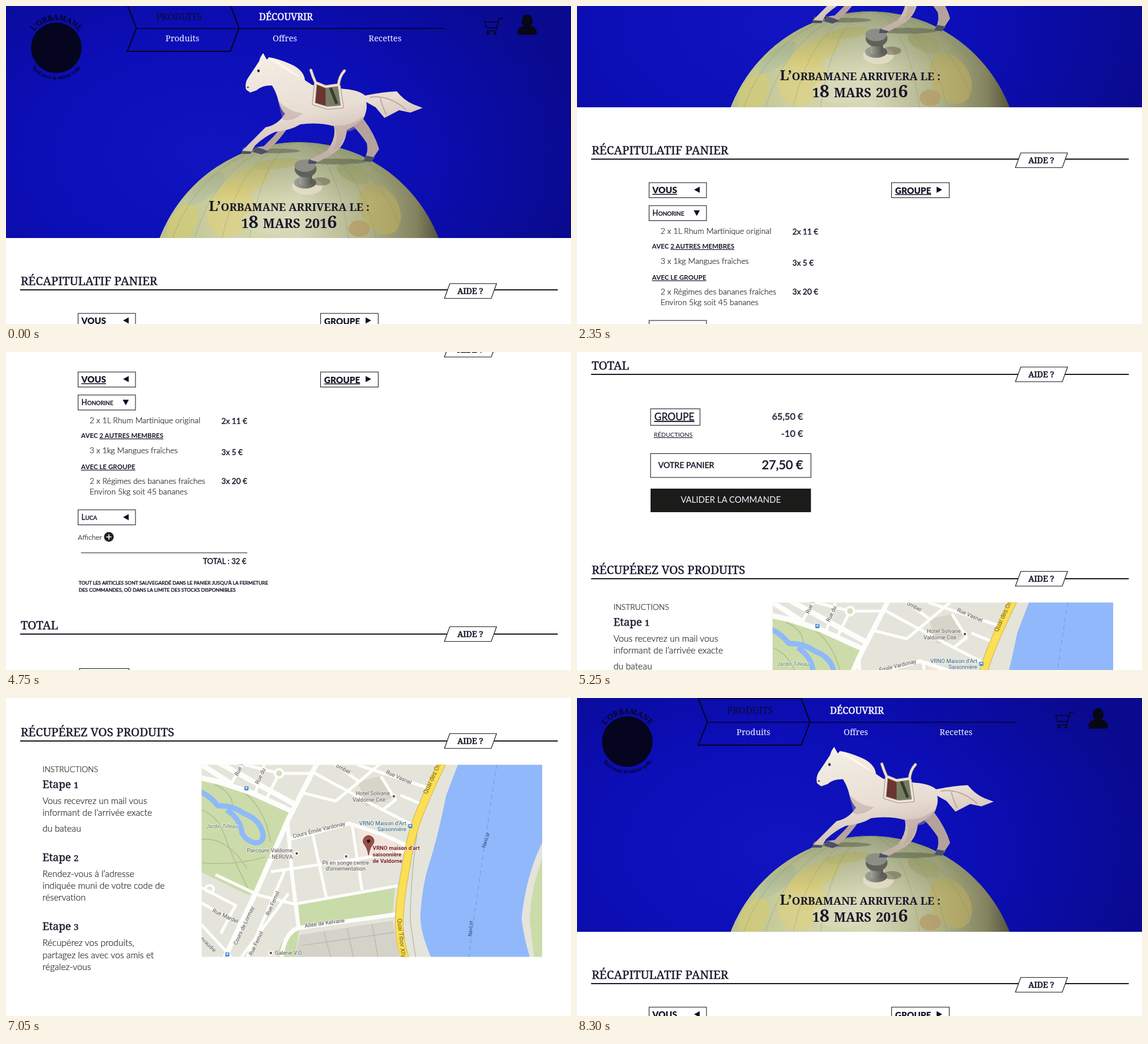
Recreate the animation shown at these times as an HTML page. Size 960 px wide and 540 px high, loop 9.3 s.

```html
<!DOCTYPE html>
<html lang="fr">
<head>
<meta charset="utf-8">
<title>Panier</title>
<style>
  html, body { margin: 0; width: 100%; height: 100%; overflow: hidden; background: #fff; }
  svg { display: block; width: 960px; height: 540px; }
  text { fill: currentColor; color: #17172a; font-family: Lato, sans-serif; }
  .serif { font-family: "Noto Serif", serif; }
  .medium { stroke: currentColor; stroke-width: .4; }
  .strong { stroke: currentColor; stroke-width: .65; }
  .bold { font-weight: 700; }
  .black { font-weight: 900; }
  .light { font-weight: 300; color: #222; stroke: currentColor; stroke-width: .22; }
  .white { color: #f4f4ff; }
  .under { text-decoration: underline; }
  .end { text-anchor: end; }
  .mid { text-anchor: middle; }
  .box { fill: #fff; stroke: #25252b; stroke-width: 1.1; }
  .map text { font: 9.4px Roboto, sans-serif; color: #555; paint-order: stroke; stroke: #f2f1ec; stroke-width: 1.6; }
  .map .blue { color: #2c6088; }
  .map .red { color: #7c2020; font-weight: 700; }
  .map .park { color: #55804a; font-style: italic; }
  .map .ferry { color: #2c4468; stroke: none; font-size: 8.5px; }
  .map .quay { color: #77601a; font-size: 10.5px; stroke: none; }
  .road { fill: none; stroke: #fdfdfb; stroke-linejoin: round; }
</style>
</head>
<body>
<svg viewBox="0 0 960 540">
  <defs>
    <radialGradient id="backdrop" gradientUnits="userSpaceOnUse" cx="350" cy="250" r="640" gradientTransform="translate(0 90) scale(1 .65)">
      <stop offset="0" stop-color="#1114c0"/><stop offset=".5" stop-color="#0c0eb6"/><stop offset="1" stop-color="#0a0a8e"/>
    </radialGradient>
    <linearGradient id="globe" gradientUnits="userSpaceOnUse" x1="260" y1="0" x2="735" y2="0">
      <stop offset="0" stop-color="#b9c08e"/><stop offset=".25" stop-color="#cfd2a4"/><stop offset=".5" stop-color="#d6d8b8"/>
      <stop offset=".75" stop-color="#aeb188"/><stop offset=".92" stop-color="#83835f"/><stop offset="1" stop-color="#55543f"/>
    </linearGradient>
    <linearGradient id="shade" gradientUnits="userSpaceOnUse" x1="0" y1="231" x2="0" y2="330">
      <stop offset="0" stop-color="#59653f" stop-opacity=".45"/><stop offset="1" stop-color="#59653f" stop-opacity="0"/>
    </linearGradient>
    <linearGradient id="coat" x1="0" y1="0" x2=".3" y2="1">
      <stop offset="0" stop-color="#f5f0e8"/><stop offset=".6" stop-color="#e8ddd2"/><stop offset="1" stop-color="#c2afa5"/>
    </linearGradient>
    <linearGradient id="knob"><stop offset="0" stop-color="#a5a59b"/><stop offset="1" stop-color="#55564f"/></linearGradient>
    <clipPath id="heroClip"><rect y="-10" width="960" height="404"/></clipPath>
    <clipPath id="globeClip"><circle cx="498" cy="485" r="254"/></clipPath>
    <clipPath id="mapClip"><rect x="332.5" y="113.5" width="578.5" height="326"/></clipPath>
    <path id="nameArc" d="M38.5 71A47 47 0 0 1 132.5 71"/>
    <path id="sloganArc" d="M31.5 71A54 54 0 0 0 139.5 71"/>
  </defs>
  <g id="page"></g>
</svg>
<script>
const text = (x, y, size, content, cls = '', attrs = '') =>
  `<text x="${x}" y="${y}" font-size="${size}" class="${cls}" ${attrs}>${content}</text>`;
const path = (d, fill, attrs = '') => `<path d="${d}" fill="${fill}" ${attrs}/>`;
const ellipse = (cx, cy, rx, ry, fill, attrs = '') =>
  `<ellipse cx="${cx}" cy="${cy}" rx="${rx}" ry="${ry}" fill="${fill}" ${attrs}/>`;
const box = (x, y, w, h) => `<rect class="box" x="${x}" y="${y}" width="${w}" height="${h}"/>`;
const line = (x1, x2, y, width, color = '#1c1c22') =>
  `<path d="M${x1} ${y}H${x2}" stroke="${color}" stroke-width="${width}"/>`;
const section = (y, content) => `<g transform="translate(0 ${y})">${content}</g>`;
const arrow = (x, y, angle) =>
  path('M-4.5 0L5 -5.2V5.2Z', '#0c0c26', `transform="translate(${x} ${y}) rotate(${angle})"`);
const small = (size, content) => `<tspan font-size="${size}">${content}</tspan>`;
// Large initial followed by smaller capitals
const smallCaps = (x, y, size, first, rest, cls) => text(x, y, size, first + small(size * .74, rest), cls);

function heading(y, title, tagOffset = 13) {
  const top = y - tagOffset + .5;
  return text(25, y - 8, 19.9, title, 'serif medium') + line(24, 937.5, y, 1.9) +
    path(`M754 ${top}H833.5L824.5 ${top + 25}H745Z`, '#fff', 'stroke="#222" stroke-width="1.2"') +
    text(767, top + 17, 13.8, 'AIDE ?', 'serif strong');
}

function horse() {
  const hooves = 'M403 240L418 242 416 251H399ZM423 239L437 243 446 247 434 252 420 248ZM515 260L530 264 526 268H513ZM612 254L627 257 620 265 607 263Z';
  const farLegs = 'M470 204Q455 222 438 238L424 240 422 246 442 247Q458 236 478 208ZM586 200Q602 216 613 233 616 248 609 259L622 261 634 243Q627 218 606 190Z';
  const body = 'M437 80Q432 86 430 94L412 121Q405 131 408 142L415 147 426 143Q436 134 452 135 460 148 463 162 467 176 474 183 462 202 441 206 427 220 412 235L401 246 417 247 423 237Q440 221 457 214 484 211 500 201 530 197 557 204 562 224 545 246L516 261 530 265 556 251Q577 237 579 211 597 202 608 190 615 174 612 163L628 172 643 190Q655 184 668 177L687 181 708 173 692 167Q676 160 664 145 640 146 610 152 600 143 576 141L520 134 508 126Q506 108 482 98 464 90 447 87L443 91Z';
  const frame = 'M518 109Q521 119 526 130L543 137 565 134Q566 120 575 110M526 131L523 166 546 173 571 171 566 136';
  const frameStroke = (color, width) =>
    path(frame, 'none', `stroke="${color}" stroke-width="${width}" stroke-linecap="round" stroke-linejoin="round"`);
  return path(farLegs, '#b6a29c') + path(hooves, '#4a5168') + path(body, 'url(#coat)') +
    path('M462 160Q480 180 505 182 486 198 470 193ZM556 203Q588 205 608 186 600 211 580 213L566 240 556 245Q568 222 556 203Z', '#b49c98', 'opacity=".45"') +
    path('M446 89Q470 95 503 124L482 112Z', '#fffaf4', 'opacity=".8"') +
    path('M618 155Q650 150 680 176M636 157Q640 172 646 184', 'none', 'stroke="#bda9a5" stroke-width="2"') +
    ellipse(429, 110, 2.2, 2.5, '#342b30') + ellipse(411, 138, 1.8, 1.5, '#6b5555') +
    path('M524 128L543 136V171L523 165Z', '#6a352f') +
    path('M543 137L565 136 570 171 543 170Z', '#777d63') +
    path('M551 138L562 166', 'none', 'stroke="#343e2f" stroke-width="5"') +
    frameStroke('#8d7b78', 5.4) + frameStroke('#eee2d6', 3.8);
}

function globe() {
  const lands = [[405, 300, 48, 20, -28, '#e2d472'], [382, 345, 38, 48, 25, '#dfd07c'], [300, 370, 22, 36, 30, '#d8cd70'],
    [340, 310, 40, 14, -40, '#b4c3a4'], [460, 268, 40, 9, -8, '#d6cc74'], [635, 345, 32, 46, -30, '#bcae60'],
    [590, 285, 30, 14, 25, '#a9ac70'], [600, 378, 18, 14, 0, '#b8955c'], [450, 365, 50, 22, 0, '#dcdcc0']]
    .map(([x, y, rx, ry, a, color]) => ellipse(x, y, rx, ry, color,
      `opacity=".6" transform="rotate(${a} ${x} ${y})"`)).join('');
  const grid = [90, 140, 190, 230].map(r =>
    `<ellipse cx="498" cy="485" rx="${r}" ry="254" fill="none" stroke="#75806a" stroke-width=".7" opacity=".5"/>`).join('');
  const ball = fill => `<circle cx="498" cy="485" r="254" fill="${fill}"/>`;
  return `<g clip-path="url(#globeClip)">${ball('url(#globe)')}${lands}${grid}${ball('url(#shade)')}</g>` +
    ellipse(455, 246, 45, 4, '#49503f', 'opacity=".45"') + ellipse(560, 264, 52, 5, '#49503f', 'opacity=".45"') +
    ellipse(512, 306, 26, 15, '#e6dfca', 'opacity=".8"') + ellipse(535, 298, 16, 7, '#5d5a45', 'opacity=".5"') +
    ellipse(508, 300, 19, 10, 'url(#knob)') + path('M498 280H520V302Q509 308 498 302Z', 'url(#knob)') +
    ellipse(509, 277, 18.5, 14, '#5f615a') + ellipse(508, 271, 18, 10.5, '#8c8e86');
}

function navigation() {
  const outline = 'fill="none" stroke="#05051c" stroke-width="2"';
  const arcText = (id, size, content, cls) =>
    `<text font-size="${size}" class="${cls}" style="color:#05051c"><textPath href="#${id}" startOffset="50%" text-anchor="middle">${content}</textPath></text>`;
  return `<circle cx="85.5" cy="71" r="43" fill="#05051f"/>` +
    arcText('nameArc', 12.8, 'L’ORBAMANE', 'serif bold') +
    arcText('sloganArc', 9, 'Tout sous la même voile', 'bold') +
    `<path d="M206 -2.5H381L396 38 381 77H206L221.5 38Z" ${outline}/>` + line(221, 745, 38.3, 1.6, '#05051c') +
    text(255, 23.5, 15.8, 'PRODUITS', 'serif', 'style="color:#0c0c2e"') +
    text(430, 23.5, 15.8, 'DÉCOUVRIR', 'serif white strong') +
    text(271, 60, 14.3, 'Produits', 'serif white') +
    text(453, 60, 14.3, 'Offres', 'serif white') +
    text(616, 60, 14.3, 'Recettes', 'serif white') +
    `<path d="M844 21.5H838L832 42.5H816M813 27H835M813 27L817 37H833" fill="none" stroke="#070716" stroke-width="1.6"/>` +
    ellipse(819, 46.5, 2.5, 2.5, '#070716') + ellipse(831, 46.5, 2.5, 2.5, '#070716') +
    ellipse(885.5, 25.5, 9.3, 11, '#070716') +
    path('M869 46Q869 36 879 34Q885 38 892 34Q902 36 902 46 902 49 898 49H873Q869 49 869 46Z', '#070716');
}

function hero() {
  return `<g clip-path="url(#heroClip)"><rect y="-10" width="960" height="404" fill="url(#backdrop)"/>${globe()}${horse()}</g>` +
    navigation() +
    text(481, 348, 24.2, 'L’' + small(18.3, 'ORBAMANE ARRIVERA LE :'), 'serif bold mid') +
    text(481, 376.5, 29.5, `${small(22.5, '1')}8 ${small(21.3, 'MARS')} ${small(22.5, '201')}6`, 'serif bold mid');
}

function cart() {
  const item = (y, label) => text(142, y, 13.65, label, 'light');
  const price = (y, label) => text(366, y, 13.2, label, 'medium');
  return heading(38, 'RÉCAPITULATIF PANIER', 11) +
    box(122.5, 78, 97.5, 25.5) + text(128, 96, 15, 'VOUS', 'black under') + arrow(203.5, 90, 0) +
    box(534.5, 78, 98, 25.5) + text(540.5, 96.5, 14.8, 'GROUPE', 'black under') + arrow(616, 90, 180) +
    box(122.5, 117, 97.5, 25.5) + smallCaps(128, 133.5, 13, 'H', 'ONORINE', 'medium') + arrow(203.5, 130, -90) +
    item(165, '2 x 1L Rhum Martinique original') + price(166, '2x 11 €') +
    text(127.5, 190, 11.2, 'AVEC <tspan class="under">2 AUTRES MEMBRES</tspan>', 'bold') +
    item(216, '3 x 1kg Mangues fraîches') + price(219, '3x 5 €') +
    text(127.5, 243, 11.2, 'AVEC LE GROUPE', 'bold under') +
    item(268, '2 x Régimes des bananes fraîches') + price(268, '3x 20 €') +
    item(286, 'Environ 5kg soit 45 bananes') +
    box(122.5, 312, 97.5, 25.5) + smallCaps(128, 329, 13, 'L', 'UCA', 'medium') + arrow(203.5, 324.5, 0) +
    text(122, 363, 12.2, 'Afficher', 'light') + ellipse(174.8, 358, 8.3, 8.3, '#222') +
    path('M170.3 358H179.3M174.8 353.5V362.5', 'none', 'stroke="#fff" stroke-width="1.7"') +
    line(127.5, 410, 385, 1.1) + text(408.5, 404, 12.8, 'TOTAL : 32 €', 'end medium') +
    text(123.5, 439, 8.32, 'TOUT LES ARTICLES SONT SAUVEGARDÉ DANS LE PANIER JUSQU’À LA FERMETURE', 'medium') +
    text(123.5, 451, 8.32, 'DES COMMANDES, OÙ DANS LA LIMITE DES STOCKS DISPONNIBLES', 'medium');
}

function total() {
  return heading(38, 'TOTAL') +
    box(125, 96.5, 84, 28) + text(131.5, 116, 16.7, 'GROUPE', 'medium under') +
    text(384, 114.5, 15.6, '65,50 €', 'end medium') +
    text(130.5, 144, 10.4, 'RÉDUCTIONS', 'under') + text(384, 144, 15.6, '-10 €', 'end medium') +
    box(125, 172.5, 272.5, 40.5) + text(138, 197, 13.7, 'VOTRE PANIER', 'medium') +
    text(384, 199, 20.7, '27,50 €', 'end strong') +
    `<rect x="125" y="232" width="272.5" height="40" fill="#1b1b19"/>` +
    text(261.2, 256, 14.4, 'VALIDER LA COMMANDE', 'white mid');
}

function mapDrawing() {
  const road = (width, d) => `<path class="road" stroke-width="${width}" d="${d}"/>`;
  const label = (x, y, content, cls = '', angle = 0) =>
    `<text class="${cls}" transform="translate(${x} ${y}) rotate(${angle})">${content}</text>`;
  const marker = (x, y) => ellipse(x, y, 4, 4, '#fff') + ellipse(x, y, 2.2, 2.2, '#6b5a55');
  const stop = (x, y) => `<rect x="${x}" y="${y}" width="7" height="7" rx="1" fill="#4a8fd6"/>` +
    `<rect x="${x + 2}" y="${y + 1.5}" width="3" height="2.5" fill="#fff"/>`;
  const quay = 'M742 108Q719 155 705 190 688 228 680 285 668 345 668 385 669 415 678 442';

  const land = `<rect x="332" y="113" width="580" height="327" fill="#e4e4db"/>` +
    path('M332 137L356 142 430 166 481 190 478 207 423 326 412 335 332 296Z', '#cbdcaa') +
    path('M332 190Q360 200 372 235T412 325M332 240Q375 235 410 290M355 147Q385 160 385 185M400 157Q440 185 450 245M332 280Q390 285 440 270', 'none', 'stroke="#b5bd92" stroke-width="1.6"') +
    path('M330 159Q348 167 360 183 385 182 404 196 432 206 437 232 437 246 424 246 406 242 401 229 398 205 375 190', 'none', 'stroke="#8fb9f8" stroke-width="9" stroke-linejoin="round"') +
    path('M497 348L661 321 657 365 500 388Z', '#c9dba9') +
    path('M499 402L657 378 668 440H491Z', '#d5d3c9') +
    path('M462 440Q464 404 498 394L491 440Z', '#c9dba9') +
    path('M596 221L655 240 670 264 602 272Z', '#f1e5de') +
    path('M598 142L637 133 657 170 612 184Z', '#d7d4c9') +
    path('M768 113H911V246Q884 300 876 374 880 408 890 440H722Q704 398 704 370 707 320 718 285 734 235 748 165Z', '#90b8fb') +
    path('M911 273Q890 330 890 380L897 440H911Z', '#cbdcaa') +
    path('M834 113Q815 230 786 440', 'none', 'stroke="#6d98e0" stroke-dasharray="8 5"');

  const roads = road(9, 'M332 136L360 142 415 160 483 191 490 193M332 113L385 147M360 109L490 180') +
    road(8.5, 'M530 108L480 205 427 325 372 440') +
    road(5, 'M403 110L380 150M440 110L424 160M464 128L441 174M464 128L520 128M464 128L405 113M520 125L560 147 640 190 690 215M560 113L600 142 560 175 500 160M640 108L600 142M596 113L715 152M637 133L662 173 640 190M670 165L706 180') +
    ellipse(464, 128, 7, 7, '#d5dfbd', 'stroke="#fff" stroke-width="4"') +
    road(6.5, 'M480 240L583 213 640 232 685 252M478 207L486 300 497 390') +
    road(5, 'M521 231L545 342M588 215L605 326M450 295L600 273 680 260M490 350L665 319M475 290L410 440M480 332L400 440') +
    road(5, 'M332 348L400 386M356 300L430 335M332 385L383 440M332 322L390 352 365 400M430 335L490 350') +
    road(7, 'M468 440Q474 395 500 390L666 367') +
    path('M505 420L660 398M540 397L552 440M580 391L590 440M622 384L632 440M703 197Q687 300 687 380L696 440', 'none', 'stroke="#bdbab0" stroke-width="1.5"') +
    ellipse(346, 324, 7, 6, 'none', 'stroke="#fff" stroke-width="4"') +
    path(quay, 'none', 'stroke="#d5b253" stroke-width="14.5"') + path(quay, 'none', 'stroke="#fbdf54" stroke-width="12.5"');

  const labels = label(394, 133, 'Rue V', '', -65) + label(429, 147, 'Rue du', '', -65) +
    label(560, 117, 'ombel', '', 28) + label(645, 128, 'Rue Vasnel', '', 24) +
    label(715, 164, 'Quai des Ormil', 'quay', -65) + label(665, 375, 'Quai Tibor XIV', 'quay', 84) +
    label(652, 165, 'Hotel Solvane', 'end') + label(652, 175.5, 'Valdorne Cité...', 'end') +
    label(680, 215.5, 'VRNO Maison d’Art', 'end blue') + label(680, 226, 'Saisonnière', 'end blue') +
    label(488, 238, 'Cours Émile Vardonay', '', -14) + label(340, 221, 'Jardin Tilleau', 'park') +
    label(487, 262, 'Parcourir Valdorne', 'end') + label(487, 272.5, '- NERUVA', 'end') +
    label(577, 283, 'Pli en songe centre', 'mid') + label(577, 293, 'd’ornementation', 'mid') +
    label(623, 257.5, 'VRNO maison d’art', 'red') + label(623, 269, 'saisonnière', 'red') + label(623, 280, 'de Valdorne', 'red') +
    label(447, 370, 'Rue Fernol', '', -66) + label(418, 438, 'Rue Fernol', '', -64) +
    label(392, 420, 'Cours de Lormay', '', -65) + label(350, 363, 'Rue Mardel', '', 25) +
    label(508, 390, 'Allée de Kelvane', '', -8) + label(330, 409, 'evaudre', '', 45) +
    label(457, 436, 'Galerie V.O') + label(814, 255, 'NavLor', 'ferry', -73) + label(791, 405, 'NavLor', 'ferry', -86);

  const pins = marker(659, 167) + marker(494, 264) + marker(578, 269) + marker(450, 433) +
    stop(405, 150) + stop(372.5, 432) + stop(683.5, 214) +
    path('M616 267Q614 255 609 249A9.3 9.3 0 1 1 623 249Q618 255 616 267Z', '#985047', 'stroke="#6f302d" stroke-width=".8"') +
    ellipse(616, 243, 2.8, 2.8, '#24110f');
  return `<g class="map" clip-path="url(#mapClip)">${land}${roads}${labels}${pins}</g>`;
}

function pickup() {
  const step = (y, number, lines) => text(62, y, 18, 'Etape ' + small(15, number), 'serif medium') +
    lines.map(([dy, content]) => text(62, y + dy, 15.25, content, 'light')).join('');
  return heading(73, 'RÉCUPÉREZ VOS PRODUITS') +
    text(62, 126, 13.4, 'INSTRUCTIONS', 'light') +
    step(153, 1, [[27, 'Vous recevrez un mail vous'], [47, 'informant de l’arrivée exacte'], [74, 'du bateau']]) +
    step(277, 2, [[27, 'Rendez-vous à l’adresse'], [47, 'indiquée muni de votre code de'], [67, 'réservation']]) +
    step(394, 3, [[27, 'Récupérez vos produits,'], [47.5, 'partagez les avec vos amis et'], [68, 'régalez-vous']]) +
    mapDrawing();
}

const LOOP = 9300, TICK = 50;
const scrolls = [
  { start: 2000, steps: 16, to: 444 },
  { start: 4750, steps: 11, to: 929 },
  { start: 6750, steps: 7, to: 1241 },
  { start: 8050, steps: 6, to: -3 },
];

function scrollAt(time) {
  let from = 0;
  for (const { start, steps, to } of scrolls) {
    if (time < start) break;
    const step = Math.floor((time - start) / TICK) + 1;
    if (step < steps) return Math.round(from + (to - from) * step / steps);
    from = to;
  }
  return from;
}

const page = document.getElementById('page');
page.innerHTML = section(0, hero()) + section(444, cart()) + section(929, total()) + section(1241, pickup());

const origin = performance.now();
function draw() {
  const time = (performance.now() - origin) % LOOP;
  page.setAttribute('transform', `translate(0 ${-scrollAt(time)})`);
  requestAnimationFrame(draw);
}
draw();
</script>
</body>
</html>
```
